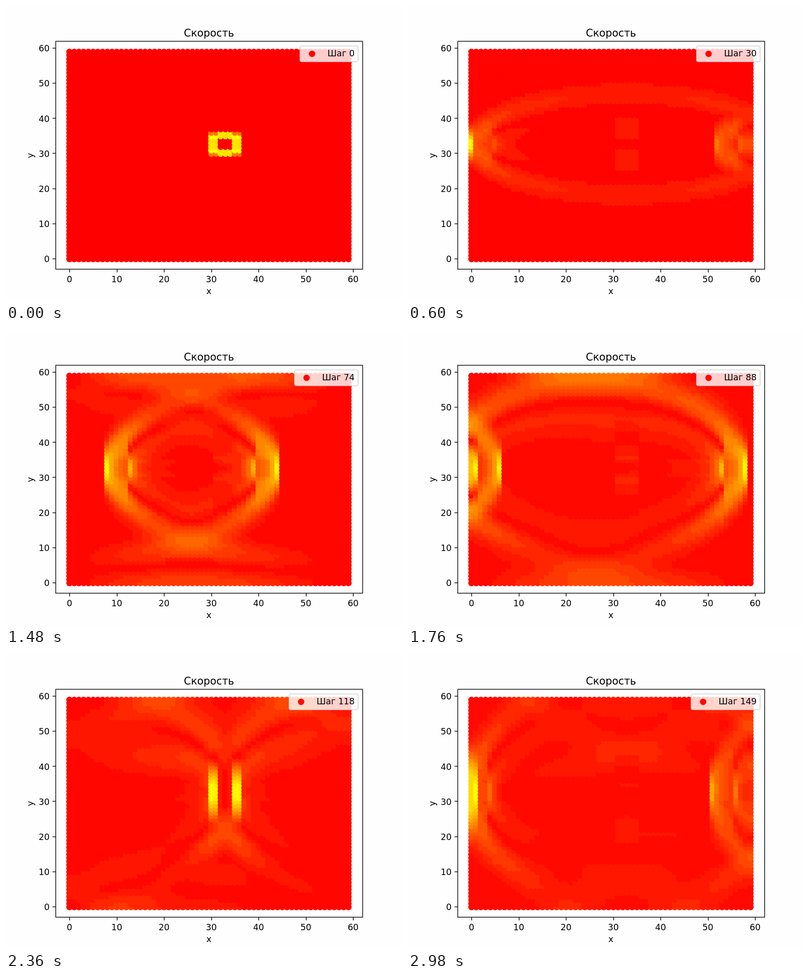
Write an HTML page with a canvas that moves like this. It is 800 px wide and 600 px high and loops after 3 s.

```html
<!DOCTYPE html>
<html lang="ru">
<head>
<meta charset="utf-8">
<style>
html, body { margin: 0; width: 100%; height: 100%; overflow: hidden; background: #fefefe; }
canvas { display: block; }
</style>
</head>
<body>
<canvas id="stage" width="800" height="600"></canvas>
<script>
const ctx = document.getElementById('stage').getContext('2d');
const N = 60, STEPS = 150, STEP_MS = 20;
const CX = 1, CY = 0.4; // Courant numbers along each axis
const FONT = '"DejaVu Sans", sans-serif', EM = 17.36, RADIUS = 6.5;
const px = i => 128.18 + i * 563.64 / 59;
const py = j => 513 - j * 420 / 59;

// One upwind step along a grid line for the Riemann invariants p + cv and p - cv.
function sweep(p, v, start, stride, c) {
  const a = [], b = [];
  for (let i = 0; i < N; i++) {
    const k = start + i * stride;
    a.push(p[k] + c * v[k]);
    b.push(p[k] - c * v[k]);
  }
  const right = a.map((w, i) => i ? w + c * (a[i - 1] - w) : 0);
  const left = b.map((w, i) => i < N - 1 ? w + c * (b[i + 1] - w) : 0);
  // Free edges: zero pressure
  right[0] = -left[0];
  left[N - 1] = -right[N - 1];
  for (let i = 0; i < N; i++) {
    const k = start + i * stride;
    p[k] = (right[i] + left[i]) / 2;
    v[k] = (right[i] - left[i]) / (2 * c);
  }
}

// Red-to-yellow map: green level per cell, averaged within 16-wide bins.
function greens(speed) {
  const min = Math.min(...speed), range = Math.max(...speed) - min;
  const levels = Array.from(speed, s => Math.min(255, Math.floor((s - min) / range * 256)));
  const sum = Array(16).fill(0), count = Array(16).fill(0);
  for (const g of levels) {
    sum[g >> 4] += g;
    count[g >> 4]++;
  }
  return levels.map(g => Math.round(sum[g >> 4] / count[g >> 4]));
}

function simulate() {
  const p = new Float64Array(N * N), vx = p.slice(), vy = p.slice(), out = [];
  for (let x = 31; x <= 35; x++)
    for (let y = 31; y <= 35; y++) p[x * N + y] = 1;
  for (let n = 0; n < STEPS; n++) {
    for (let y = 0; y < N; y++) sweep(p, vx, y, N, CX);
    for (let x = 0; x < N; x++) sweep(p, vy, x * N, 1, CY);
    out.push(greens(vx.map((u, k) => Math.hypot(u, vy[k]))));
  }
  return out;
}

function dot(x, y, green) {
  ctx.fillStyle = `rgb(255,${green},0)`;
  ctx.beginPath();
  ctx.arc(x, y, RADIUS, 0, 2 * Math.PI);
  ctx.fill();
}

function text(str, x, y, align = 'center', size = EM) {
  ctx.font = `${size}px ${FONT}`;
  ctx.textAlign = align;
  ctx.fillStyle = '#000';
  ctx.fillText(str, x, y);
}

function line(x1, y1, x2, y2) {
  ctx.beginPath();
  ctx.moveTo(x1, y1);
  ctx.lineTo(x2, y2);
  ctx.stroke();
}

function drawAxes() {
  ctx.strokeStyle = '#000';
  ctx.lineWidth = 1.39;
  ctx.strokeRect(100.5, 71.5, 620, 462);
  for (let v = 0; v <= 60; v += 10) {
    const x = Math.floor(px(v) + 0.5) + 0.5;
    const y = 599.5 - Math.floor(600.5 - py(v));
    line(x, 534, x, 540);
    line(94, y, 100, y);
    text(v, px(v), 560);
    text(v, 88, py(v) + 6.3, 'right');
  }
  text('Скорость', 410, 62, 'center', EM * 1.2);
  text('x', 410, 584);
  ctx.save();
  ctx.translate(55, 303);
  ctx.rotate(-Math.PI / 2);
  text('y', 0, 0);
  ctx.restore();
}

function drawLegend(step, green) {
  const label = 'Шаг ' + step;
  ctx.font = `${EM}px ${FONT}`;
  const textX = 704.4 - ctx.measureText(label).width;
  const left = textX - 3.2 * EM;
  ctx.beginPath();
  ctx.roundRect(left, 81, 711.3 - left, 32, 3.5);
  ctx.fillStyle = 'rgba(255,255,255,.8)';
  ctx.fill();
  ctx.strokeStyle = 'rgba(204,204,204,.8)';
  ctx.lineWidth = 1.74;
  ctx.stroke();
  dot(textX - 1.8 * EM, 97, green);
  text(label, textX, 102, 'left');
}

function draw(step) {
  const cells = frames[step];
  ctx.fillStyle = '#fefefe';
  ctx.fillRect(0, 0, 800, 600);
  cells.forEach((g, k) => dot(px(Math.floor(k / N)), py(k % N), g));
  drawAxes();
  drawLegend(step, Math.min(...cells));
}

const frames = simulate();
let shown = 0;
draw(0);

function tick(now) {
  const step = Math.floor(now / STEP_MS) % STEPS;
  if (step !== shown) draw(shown = step);
  requestAnimationFrame(tick);
}
requestAnimationFrame(tick);
</script>
</body>
</html>
```
